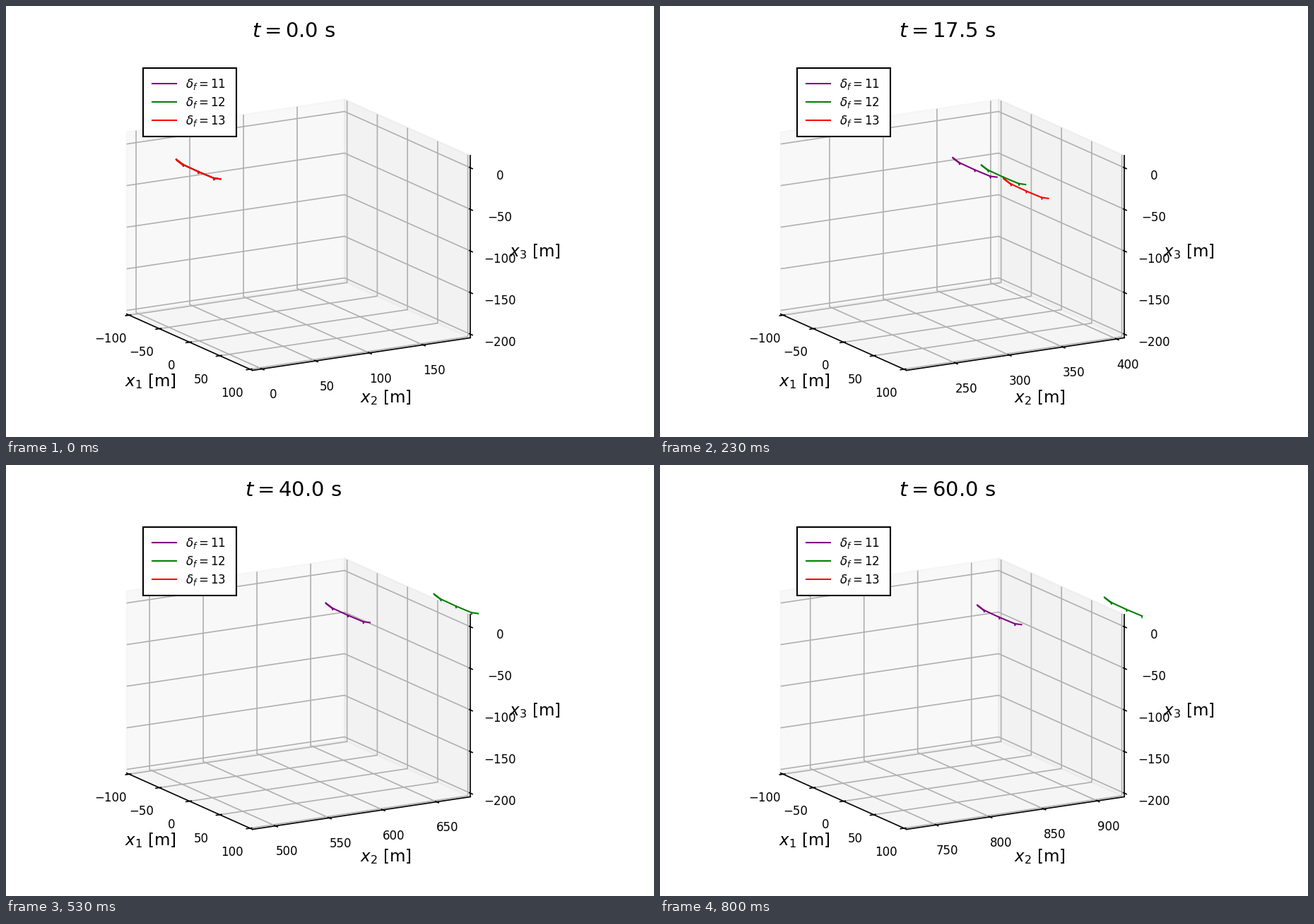
A matplotlib script for the animation above (830 ms loop, 917 px wide and 611 px high).

```python
import math

import matplotlib.pyplot as plt
import numpy as np
from matplotlib.animation import FuncAnimation
from matplotlib.collections import LineCollection
from matplotlib.patches import Polygon, Rectangle

W, H, DPI = 917, 611, 100
PX = 72 / DPI                      # one pixel in points
TICK_PT, LABEL_PT, TITLE_PT = 12, 16.5, 21
THIN, THICK = 1.67 * PX, 2.08 * PX

# Orthographic box: left bottom corner and the screen vectors of its edges
ORIGIN = np.array([170.7, 436.7])
E1 = np.array([178.1, 79.8])
E2 = np.array([308.4, -46.1])
E3 = np.array([0.0, -258.0])
PAD = 1 / 50                       # share of an edge outside the limits
X2_SPAN = 202.9
X2_START, X2_SPEED = -8.8, 12.186
STEP = 2.5                         # seconds of flight per picture


def at(a, b, c):
    """Screen point for box fractions along x1, x2, x3."""
    return ORIGIN + a * E1 + b * E2 + c * E3


def frac(value, low, high):
    return PAD + (1 - 2 * PAD) * (value - low) / (high - low)


def number(v):
    return f"{v:d}".replace("-", "\u2212")


def slopes(t, y):
    """Monotone slopes: harmonic mean inside, flat at extrema."""
    d = np.diff(y) / np.diff(t)
    m = np.zeros(len(y))
    for i in range(1, len(y) - 1):
        if d[i - 1] * d[i] > 0:
            m[i] = 2 * d[i - 1] * d[i] / (d[i - 1] + d[i])
    m[0] = (3 * d[0] - m[1]) / 2
    m[-1] = (3 * d[-1] - m[-2]) / 2
    return m


def smooth(now, t, y):
    t, y = np.array(t, float), np.array(y, float)
    m = slopes(t, y)
    now = min(max(now, t[0]), t[-1])
    i = min(int(np.searchsorted(t, now, side="right")) - 1, len(t) - 2)
    h = t[i + 1] - t[i]
    u = (now - t[i]) / h
    return ((1 + 2 * u) * (1 - u) ** 2 * y[i] + u * (1 - u) ** 2 * h * m[i]
            + u * u * (3 - 2 * u) * y[i + 1] + u * u * (u - 1) * h * m[i + 1])


# Way of the left wing tip on the screen: times, x, y
TIMES = [0, 12.5, 25, 35, 47.5, 55, 60]
FLIGHTS = [
    ("purple", 11, TIMES, [241, 408.5, 420.5, 447.5, 456, 451, 449],
     [217.5, 215.5, 213.5, 194, 198.5, 196.5, 198.5]),
    ("green", 12, TIMES, [241, 425, 491, 566.5, 643, 618.5, 629],
     [217.5, 218.5, 237, 184, 182, 184, 187.5]),
    ("red", 13, TIMES[:4], [241, 441.5, 551.5, 712],
     [217.5, 221.5, 326, 540]),
]
SPAN = np.array([(0, 0), (9.5, 7.3), (31, 17.3), (53, 26.5), (62.5, 27.8)])
RIB = np.array([0.4, 2.1])
TIP = np.array([(0.8, 1.2), (10, 8.3)])


def wing(x, y):
    pts = SPAN + (x, y)
    return [pts, TIP + (x, y)] + [[p, p + RIB] for p in pts[1:4]]


fig = plt.figure(figsize=(W / DPI, H / DPI), dpi=DPI, facecolor="white")
ax = fig.add_axes([0, 0, 1, 1])
ax.set_xlim(0, W)
ax.set_ylim(H, 0)
ax.axis("off")


def text(x, y, s, size, ha="center"):
    return ax.text(x, y, s, fontsize=size, ha=ha, va="baseline",
                   family="DejaVu Sans", color="black", zorder=6)


def lines(segments, color, width, z, cap="butt"):
    group = LineCollection(segments, colors=color, linewidths=width,
                           capstyle=cap, zorder=z)
    return ax.add_collection(group, autolim=False)


# Panes
for shade, corners in [
    (0.95, [(0, 0, 0), (0, 1, 0), (0, 1, 1), (0, 0, 1)]),
    (0.90, [(0, 1, 0), (1, 1, 0), (1, 1, 1), (0, 1, 1)]),
    (0.925, [(0, 0, 0), (1, 0, 0), (1, 1, 0), (0, 1, 0)]),
]:
    tone = (shade,) * 3 + (0.5,)
    ax.add_patch(Polygon([at(*c) for c in corners], facecolor=tone,
                         edgecolor=tone, linewidth=THICK, zorder=1))

# Fixed grid, ticks and numbers of x1 and x3; ticks reach further outward
IN, OUT = 0.08, 0.16
grid, marks = [], []
for v in range(-100, 101, 50):
    a = frac(v, -100, 100)
    foot = at(a, 0, 0)
    grid.append([foot, at(a, 1, 0), at(a, 1, 1)])
    marks.append([foot + IN * E2 / 10, foot - OUT * E2 / 10])
    text(foot[0] - 25.8, foot[1] + 38.8, number(v), TICK_PT)
for v in range(-200, 1, 50):
    c = frac(v, -200, 10)
    foot = at(1, 1, c)
    grid.append([at(0, 0, c), at(0, 1, c), foot])
    marks.append([foot - IN * E1 / 10, foot + OUT * E1 / 10])
    text(699, foot[1] + 16.4, number(v), TICK_PT)
lines(grid, "#b0b0b0", THIN, 2)
lines(marks, "black", THIN, 3, "projecting")
lines([[at(0, 0, 0), at(1, 0, 0)], [at(1, 0, 0), at(1, 1, 0)],
       [at(1, 1, 0), at(1, 1, 1)]], "black", THIN, 3, "projecting")

text(204, 539, "$x_1$ [m]", LABEL_PT)
text(537, 562.5, "$x_2$ [m]", LABEL_PT)
text(748, 354.8, "$x_3$ [m]", LABEL_PT)
title = text(407, 43.5, "", TITLE_PT)

# Legend
ax.add_patch(Rectangle((193.5, 88), 132.5, 97.3, facecolor="white",
                       edgecolor="black", linewidth=THICK, zorder=5))
for row, (color, flap, *_) in enumerate(FLIGHTS):
    y = 110 + 26 * row
    lines([[(207.2, y), (240.7, y)]], color, THICK, 6, "projecting")
    text(254, y + 5.9, rf"$\delta_f = {flap}$", TICK_PT, "left")

# Moving parts
x2_grid = lines([], "#b0b0b0", THIN, 2)
x2_marks = lines([], "black", THIN, 3, "projecting")
x2_numbers = [text(0, 0, "", TICK_PT) for _ in range(4)]
view = Rectangle((131, 56), 552, 552, transform=ax.transData)
wings = []
for color, *_ in FLIGHTS:
    group = lines([], color, THICK, 4, "projecting")
    group.set_clip_path(view)
    wings.append(group)


def draw(k):
    t = STEP * math.floor((k + 0.5) * 0.3)
    title.set_text(f"$t = {t:.1f}$ s")

    left = X2_START + X2_SPEED * t
    low, high = left + PAD * X2_SPAN, left + (1 - PAD) * X2_SPAN
    values = range(50 * math.ceil(low / 50), math.floor(high) + 1, 50)
    segs, ticks = [], []
    for label in x2_numbers:
        label.set_text("")
    for v, label in zip(values, x2_numbers):
        b = (v - left) / X2_SPAN
        foot = at(1, b, 0)
        segs.append([foot, at(0, b, 0), at(0, b, 1)])
        ticks.append([foot - IN * E1 / 10, foot + OUT * E1 / 10])
        label.set_position((foot[0] + 15.8, foot[1] + 41.8))
        label.set_text(number(v))
    x2_grid.set_segments(segs)
    x2_marks.set_segments(ticks)

    for group, (_, _, times, xs, ys) in zip(wings, FLIGHTS):
        group.set_segments(wing(smooth(t, times, xs), smooth(t, times, ys)))
    return [title, x2_grid, x2_marks, *x2_numbers, *wings]


anim = FuncAnimation(fig, draw, frames=83, interval=10, repeat=True, blit=False)
plt.show()
```
